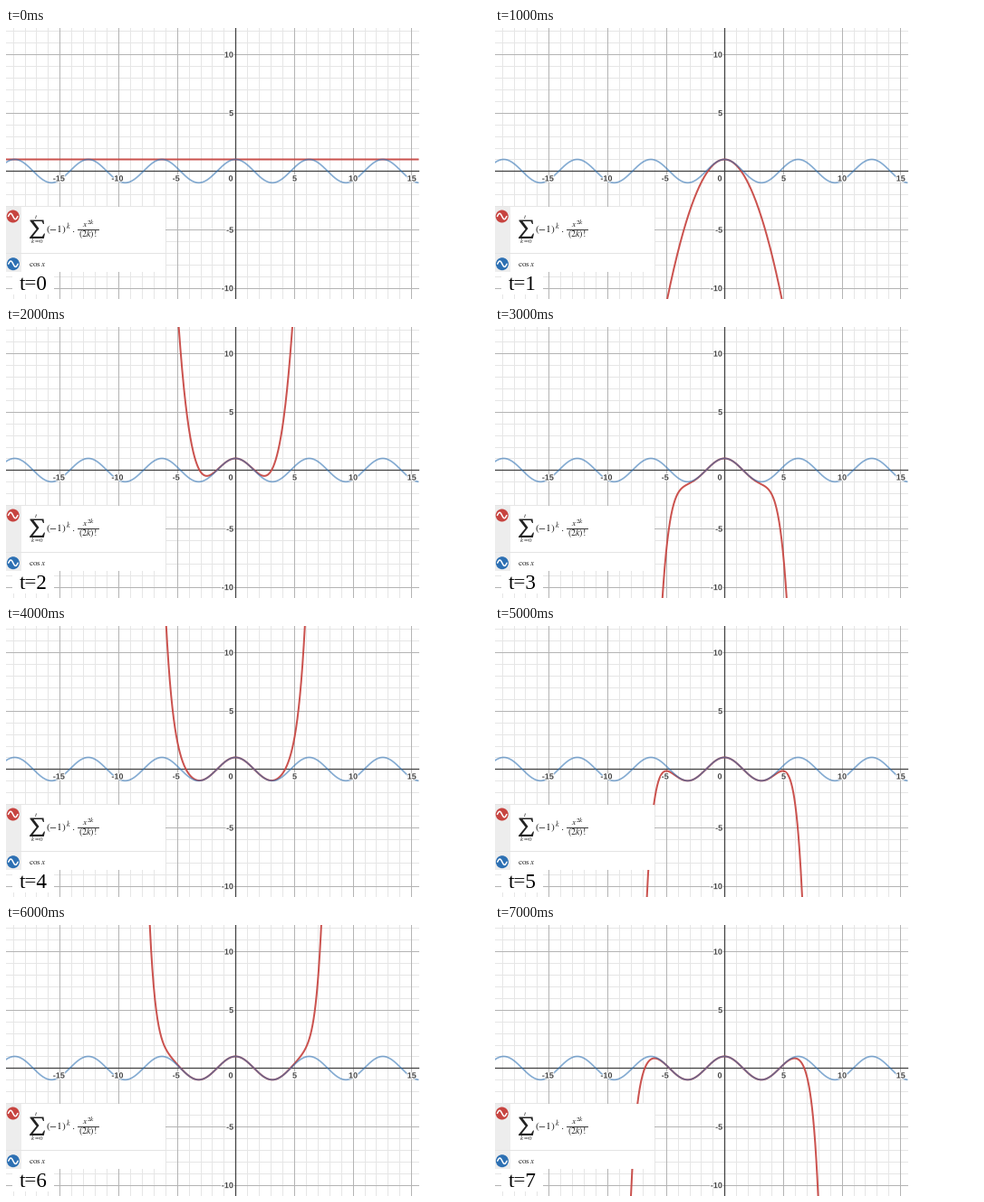
These frames come from a looping animation (533x300 px, 8 s). A matplotlib script:

```python
from math import factorial

import matplotlib.pyplot as plt
import numpy as np
from matplotlib.animation import FuncAnimation
from matplotlib.patches import Circle, Polygon, Rectangle
from matplotlib.patheffects import withStroke

W, H, DPI = 533, 300, 100
PX = 72 / DPI                      # points per pixel
X0, Y0, UNIT = 253.3, 158.4, 12.93
EDGE = 454.5                       # right end of the graph
RED, BLUE, INK = "#c74440", "#2d70b3", "#222222"

plt.rcParams["mathtext.fontset"] = "stix"
fig = plt.figure(figsize=(W / DPI, H / DPI), dpi=DPI, facecolor="white")
ax = fig.add_axes([0, 0, 1, 1])
ax.set_xlim(0, W)
ax.set_ylim(H, 0)
ax.axis("off")


def sx(x):
    return X0 + UNIT * x


def sy(y):
    return Y0 - UNIT * y


def line(xs, ys, color, width, z, **kw):
    return ax.plot(xs, ys, color=color, lw=width * PX, zorder=z, **kw)[0]


def box(x, y, w, h, color, z):
    ax.add_patch(Rectangle((x, y), w, h, fc=color, ec="none", zorder=z))


def label(x, y, text, size, z=12, **kw):
    kw = {"color": INK, "ha": "center", "va": "baseline", **kw}
    return ax.text(x, y, text, fontsize=size * PX, zorder=z, **kw)


def draw_grid():
    for n in range(-19, 16):
        major = n % 5 == 0
        color, width = ("#b4b4b4", 1) if major else ("#e6e6e6", 1)
        line([sx(n)] * 2, [0, H], color, width, 2 if major else 1)
        if -11 <= n <= 12:
            line([0, EDGE], [sy(n)] * 2, color, width, 2 if major else 1)
    line([sx(0)] * 2, [0, H], "#444444", 1.3, 3)
    line([0, EDGE], [sy(0)] * 2, "#444444", 1.3, 3)


def draw_ticks():
    style = dict(family="Liberation Sans", weight="bold", color="#444444",
                 va="center_baseline",
                 path_effects=[withStroke(linewidth=2 * PX, foreground="white")])
    for n in (-15, -10, -5, 5, 10, 15):
        label(sx(n) - (1 if n < 0 else -0.5), 166, str(n), 9, z=6, **style)
    for n in (-10, -5, 5, 10):
        label(251, sy(n), str(n), 9, z=6, **{**style, "ha": "right"})
    label(248, 166, "0", 9, z=6, **style)


def draw_icon(x, y, color):
    ax.add_patch(Circle((x, y), 7, fc=color, ec="none", zorder=12))
    u = np.linspace(-1, 1, 40)
    line(x + 5.2 * u, y - 3.2 * np.sin(np.pi * -u), "white", 1.5, 13,
         solid_capstyle="round")


def draw_panel():
    box(0, 198, 176, 72, "white", 10)
    box(0, 198, 17, 50.5, "#ededed", 11)
    box(0, 249, 17, 21, "#ededed", 11)
    line([0, 176], [248.5] * 2, "#e4e4e4", 1, 11)
    draw_icon(7.7, 208.5, RED)
    draw_icon(7.9, 261.2, BLUE)

    sigma = [(26.5, 212.5), (41.5, 212.5), (42, 217), (41, 217), (39.5, 214),
             (30.5, 214), (36.5, 222), (29.5, 230.8), (40, 230.8), (42, 227.5),
             (43, 227.5), (41.8, 233), (26, 233), (26, 232), (33.6, 222.7),
             (26.5, 213.5)]
    ax.add_patch(Polygon(sigma, fc=INK, ec="none", zorder=12))
    label(33.5, 211, "$t$", 7.5)
    label(34.3, 238, "$k=0$", 7)
    label(44, 225.7, "$(-1)$", 11.5, ha="left")
    label(69, 221.5, "$k$", 8)
    label(74.3, 225.7, r"$\cdot$", 11)
    label(87, 220.5, "$x$", 9.5)
    label(93.7, 217.2, "$2k$", 7.5)
    line([79, 101.5], [222.5] * 2, INK, 0.9, 12)
    label(90, 231, "$(2k)!$", 10)
    label(25, 264.3, r"$\mathrm{cos}\,x$", 9.2, ha="left")


draw_grid()
draw_ticks()
draw_panel()
box(7, 270, 46, 25, "white", 10)
counter = label(14.5, 289.8, "", 23, ha="left", family="Liberation Serif",
                color="black")

x = np.linspace(-X0 / UNIT, (EDGE - X0) / UNIT, 1600)
series = line([], [], RED, 2, 4, alpha=0.92)
line(sx(x), sy(np.cos(x)), BLUE, 1.7, 5, alpha=0.58)


def update(t):
    y = sum((-1) ** k * x ** (2 * k) / factorial(2 * k) for k in range(t + 1))
    series.set_data(sx(x), sy(np.clip(y, -40, 40)))
    counter.set_text(f"t={t}")
    return series, counter


anim = FuncAnimation(fig, update, frames=8, interval=1000, repeat=True,
                     repeat_delay=0)
plt.show()
```
